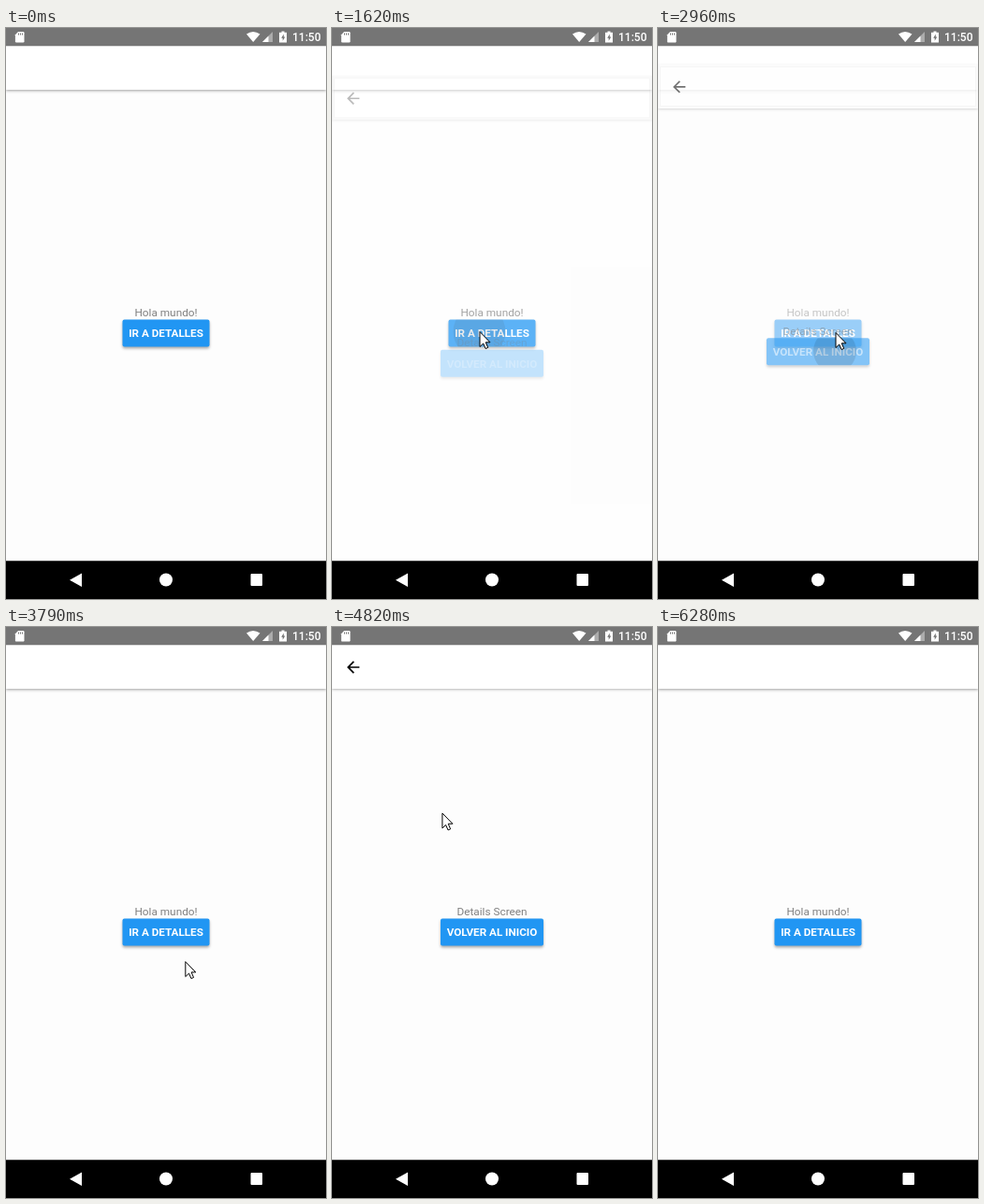
An HTML page that plays this animation: 342x610 px, repeating every 7430 ms.

```html
<!DOCTYPE html>
<html lang="es">
<head>
<meta charset="utf-8">
<title>Navegación</title>
<style>
html, body { margin: 0; width: 100%; height: 100%; overflow: hidden; background: #fdfdfd; }
body { position: relative; font: 11.8px Roboto, sans-serif; }
#overlay, .screen { position: absolute; left: 0; top: 0; width: 342px; height: 610px; }
/* Every layer of a screen fades on its own through --a, so overlaps stay light. */
.screen { --a: 1; top: 19px; height: 551px; background: rgb(253 253 253 / var(--a)); }
.header { --shadow: 0 1px 3px rgb(0 0 0 / calc(.38 * var(--a))); position: absolute; width: 342px; height: 47px;
  background: rgb(255 255 255 / var(--a)); box-shadow: var(--shadow); }
.moving .header { box-shadow: var(--shadow), inset 0 0 0 2px rgb(255 255 255 / var(--a)), inset 0 0 0 3px rgb(0 0 0 / .03); }
.header svg { position: absolute; left: 0; top: 0; overflow: visible; opacity: var(--a); }
.label { position: absolute; top: 277px; width: 342px; line-height: 16px; text-align: center; color: rgb(128 128 128 / var(--a)); }
.button { position: absolute; left: 171px; top: 292px; height: 29px; line-height: 30px; transform: translate(-50%, .4px);
  border-radius: 2px; background: rgb(33 150 243 / var(--a)); box-shadow: 0 2px 3px rgb(0 0 0 / calc(.32 * var(--a)));
  color: rgb(255 255 255 / var(--a)); font-weight: 700; font-size: 11.7px; text-align: center;
  white-space: nowrap; overflow: hidden; }
.ripple { position: absolute; border-radius: 50%; background: #000; opacity: 0; }
</style>
</head>
<body>
<div class="screen" id="home">
  <div class="header"></div>
  <div class="label">Hola mundo!</div>
  <div class="button" style="width:93px">IR A DETALLES<i class="ripple" id="homeRipple"></i></div>
</div>
<div class="screen" id="details">
  <div class="header">
    <i class="ripple" id="backRipple"></i>
    <svg width="40" height="47"><path transform="translate(12.700 14) scale(.832)" d="M20 11H7.83l5.59-5.59L12 4l-8 8 8 8 1.41-1.41L7.83 13H20z"/></svg>
  </div>
  <div class="label">Details Screen</div>
  <div class="button" style="width:110px">VOLVER AL INICIO<i class="ripple" id="detailsRipple"></i></div>
</div>
<svg id="overlay" viewBox="0 0 342 610">
  <path fill="#757575" d="M0 0H342V19.300H0z"/>
  <g fill="#fff">
    <path d="M13 4h5.2q1.3 0 1.3 1.3v9q0 1.3-1.3 1.3h-7q-1.3 0-1.3-1.3V7.2z"/>
    <path d="M257 6.5Q264 1.5 271.500 6.5L264.200 15z"/>
    <path opacity=".4" d="M285 4V15H274z"/>
    <path d="M280.500 8.500V15H274z"/>
    <path d="M294.500 3.500h3v1.200h2.500V15.500h-8V4.700h2.500z"/>
    <text x="306" y="14" font-size="12" font-weight="500" font-family="Roboto, sans-serif">11:50</text>
  </g>
  <path stroke="#757575" d="M13.500 5.500v2M15.500 5.500v2M17.500 5.500v2"/>
  <path fill="#757575" d="M296.800 6.500l-2.600 4.200h1.500v3l2.600-4.200h-1.500z"/>
  <path d="M0 569.200H342V610H0z"/>
  <g fill="#fff">
    <path d="M81 582.500V597L68 589.700z"/>
    <circle cx="171" cy="589.500" r="7"/>
    <rect x="261.500" y="583" width="12.500" height="13" rx="1"/>
  </g>
  <path id="cursor" fill="#fff" stroke="#000" d="M1 .5V16.500L4.700 13 7.100 18.500 9.700 17.400 7.300 11.800H12z"/>
</svg>
<script>
const LOOP = 7430, SLIDE = 44, OPEN_MS = 350, CLOSE_MS = 150;
const START = { x: 303, y: 400 };
// Cursor moves: start, end, x, y, sideways bend
const MOVES = [
  [590, 1110, 157, 324], [1640, 1960, 191, 362], [2270, 2550, 189, 325], [2990, 3370, 196, 369],
  [3620, 4070, 180, 332], [4485, 5150, 44, 69, 6], [5190, 5360, 25, 52], [6160, 6280, -13, 67]
];
// Details screen visits: opening start, closing start
const VISITS = [[1600, 2838], [4510, 5720]];

const $ = id => document.getElementById(id);
const clamp = v => Math.min(1, Math.max(0, v));

function cursorAt(t) {
  let { x, y } = START;
  for (const [from, to, nx, ny, bend = 0] of MOVES) {
    const u = clamp((t - from) / (to - from));
    const s = u * u * (3 - 2 * u);
    x += (nx - x) * s + bend * 4 * u * (1 - u);
    y += (ny - y) * s;
  }
  return [x, y];
}

function detailsAt(t) {
  const visit = VISITS.find(([open, close]) => t >= open && t < close + CLOSE_MS);
  if (!visit) return 0;
  const opened = 1 - (1 - clamp((t - visit[0]) / OPEN_MS)) ** 5;
  return opened - clamp((t - visit[1]) / CLOSE_MS) ** 4;
}

function ripple(id, t, start, x, y, maxRadius) {
  const u = (t - start) / 400, r = maxRadius * (.3 + .7 * clamp(u * 1.5));
  const s = $(id).style;
  s.left = x - r + 'px';
  s.top = y - r + 'px';
  s.width = s.height = 2 * r + 'px';
  s.opacity = u >= 0 && u < 1 ? .1 * Math.min(1, 2 - 2 * u) : 0;
}

function draw(t) {
  const p = detailsAt(t), details = $('details');
  details.style.setProperty('--a', p);
  details.style.visibility = p > 0 ? 'visible' : 'hidden';
  details.style.transform = `translateY(${SLIDE * (1 - p)}px)`;
  details.classList.toggle('moving', p < .98);

  const firstVisit = t < 3000;
  ripple('homeRipple', t, firstVisit ? 1520 : 4440, firstVisit ? 33 : 56, firstVisit ? 13 : 21, 50);
  ripple('detailsRipple', t, 2900, 73, 14, 50);
  ripple('backRipple', t, 5610, 23, 24, 17);

  const [x, y] = cursorAt(t);
  $('cursor').setAttribute('transform', `translate(${x} ${y})`);
  $('cursor').style.display = t >= 590 && t < 6280 ? '' : 'none';
}

const began = performance.now();
function frame() {
  draw((performance.now() - began) % LOOP);
  requestAnimationFrame(frame);
}
frame();
</script>
</body>
</html>
```
